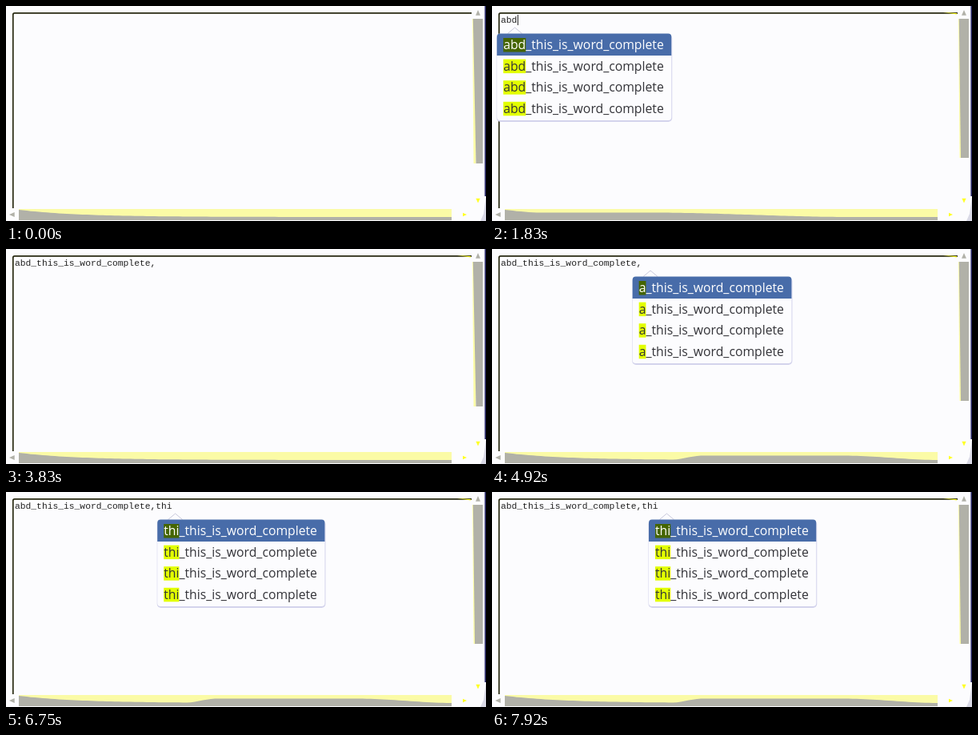
These frames come from a looping animation (600x269 px, 8000 ms). An HTML page with a canvas:

```html
<!DOCTYPE html>
<html lang="en">
<head>
<meta charset="utf-8">
<title>Word completion</title>
<style>
html, body { margin: 0; width: 100%; height: 100%; overflow: hidden; background: #fcfcfe; }
canvas { display: block; width: 600px; height: 269px; }
</style>
</head>
<body>
<canvas id="stage"></canvas>
<script>
const LOOP = 8000;
const CHAR = 6.78;
const SUFFIX = '_this_is_word_complete';
const PAPER = '#fcfcfe', GREY = '#b1b1a8', PALE = '#fbfba6', YELLOW = '#ffff24', INK = '#292a12';

// Keys by time: "<" deletes, "+" accepts the suggestion, quick strokes share one entry.
const keys = {
  600: 'a', 1250: 'b', 1740: 'd', 2420: '+', 3200: ',',
  4000: 'a', 4330: '<', 5080: 't', 5330: 'h', 5740: 'is',
  6000: '<', 6200: '<i', 6990: 's', 7330: '<'
};

function press(text, key) {
  if (key === '<') return text.slice(0, -1);
  return text + (key === '+' ? SUFFIX : key);
}

// The list opens at the caret as it was before the key and keeps its word when that is deleted.
function stateAt(time) {
  let text = '', stem = '', column = 0, since = 0;
  for (const [start, stroke] of Object.entries(keys)) {
    if (start > time) break;
    column = text.length;
    text = [...stroke].reduce(press, text);
    const word = text.match(/(?:^|,)([a-z]+)$/);
    if (word) stem = word[1];
    else if (stroke !== '<') stem = '';
    since = Number(start);
  }
  const caret = since > 0 && (time - since) % 1060 < 530;
  return { text, stem, column, caret };
}

const canvas = document.getElementById('stage');
const ctx = canvas.getContext('2d');
const ratio = window.devicePixelRatio || 1;
canvas.width = 600 * ratio;
canvas.height = 269 * ratio;
ctx.scale(ratio, ratio);

function rect(x, y, w, h, color) {
  ctx.fillStyle = color;
  ctx.fillRect(x, y, w, h);
}

function poly(points, color) {
  ctx.beginPath();
  points.forEach(([x, y]) => ctx.lineTo(x, y));
  ctx.closePath();
  ctx.fillStyle = color;
  ctx.fill();
}

function box(x, y, w, h, radius, color) {
  ctx.beginPath();
  ctx.roundRect(x, y, w, h, radius);
  ctx.fillStyle = color;
  ctx.fill();
}

function arrow(x, y, angle, size, color) {
  const corner = turn => [x + size * Math.cos(angle + turn), y + size * Math.sin(angle + turn)];
  poly([corner(0), corner(2.3), corner(-2.3)], color);
}

function smooth(from, to, x) {
  const k = Math.min(1, Math.max(0, (x - from) / (to - from)));
  return k * k * (3 - 2 * k);
}

function drawFrame(typed) {
  rect(0, 0, 600, 269, PAPER);
  ctx.strokeStyle = INK;
  ctx.lineWidth = 1.7;
  ctx.beginPath();
  ctx.moveTo(8.8, 253);
  ctx.arcTo(8.8, 8.9, 582, 8.9, 2);
  ctx.lineTo(582, 8.9);
  ctx.stroke();
  if (typed) poly([[564, 8], [581, 9], [581, 10.5]], YELLOW);
  rect(597.5, 0, 1, 238, '#d8d8ee');
  rect(598.5, 0, 1.5, 238, '#20205e');
}

// The grey band sinks from the left; an open list raises a hump in it.
function crest(x, open, column) {
  const base = 264 - 9 * Math.exp(-(x - 16) / 75);
  if (!open) return base;
  const hump = column < 20
    ? 1 - smooth(200, 450, x)
    : smooth(220, 265, x) * (1 - smooth(440, 560, x));
  return Math.min(base, 264 - 5.5 * hump);
}

function drawScrollbars(open, column) {
  const end = open ? 190 : 197;
  const lean = open ? 586 : 587.5;
  arrow(590, 9, -Math.PI / 2, 4, GREY);
  poly([[583, 16], [586, 16], [lean, end], [584.5, end]], PALE);
  poly([[583.8, 16], [596, 16], [596, end], [lean, end]], GREY);
  arrow(590, 243, Math.PI / 2, 3.5, YELLOW);

  arrow(8, 261, Math.PI, 4, GREY);
  rect(16, 254, 541, 14, PALE);
  const band = [[557, 268], [16, 268]];
  for (let x = 16; x <= 557; x += 5) band.push([x, crest(x, open, column)]);
  band.push([557, 264]);
  poly(band, GREY);
  arrow(573, 261, 0, 3, YELLOW);
  poly([[600, 238], [600, 269], [593, 269], [597, 260]], '#d9d9e6');
}

function drawText(text, caret) {
  ctx.font = '11.3px "Liberation Mono", monospace';
  ctx.fillStyle = '#222';
  ctx.fillText(text, 11, 21);
  if (caret) rect(11.5 + text.length * CHAR, 11, 1, 13, '#222');
}

function drawList(stem, column) {
  ctx.font = '15.76px "Open Sans", sans-serif';
  const label = stem + SUFFIX;
  const x = 0.6 + column * CHAR;
  const left = x - 8, top = 34.5, height = 108.5;
  const width = ctx.measureText(label).width + 17.5;
  const mark = ctx.measureText(stem).width;
  const tip = left + 22.4;

  box(left - 0.5, top + 1, width + 1.5, height + 1, 5, '#d3d3ec');
  box(left, top, width, height, 4, PAPER);
  ctx.strokeStyle = '#c9c9dc';
  ctx.lineWidth = 1;
  ctx.beginPath();
  ctx.moveTo(tip - 9, top);
  ctx.lineTo(tip, 27);
  ctx.lineTo(tip + 9, top);
  ctx.stroke();
  box(left, top, width, 27.5, [4, 4, 0, 0], '#486ca9');

  for (let row = 0; row < 4; row++) {
    const base = 54 + row * 26.6;
    rect(x, base - 14, mark, 17.5, row ? '#e2ff00' : '#456500');
    ctx.fillStyle = row ? '#333338' : '#fff';
    ctx.fillText(label, x, base);
  }
}

function draw(time) {
  const { text, stem, column, caret } = stateAt(time);
  drawFrame(text);
  drawScrollbars(stem, column);
  drawText(text, caret);
  if (stem) drawList(stem, column);
}

const origin = performance.now();
function tick() {
  draw((performance.now() - origin) % LOOP);
  requestAnimationFrame(tick);
}
tick();
</script>
</body>
</html>
```
